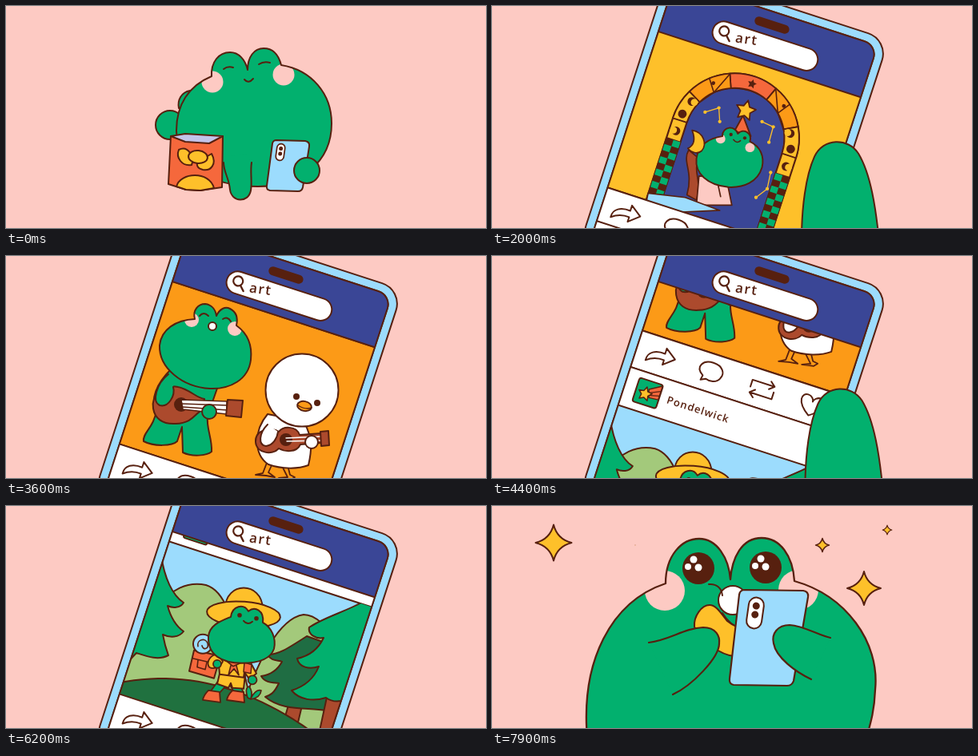
Write an HTML page with a canvas that moves like this. It is 600x278 px and loops after 8000 ms.

```html
<!DOCTYPE html>
<html lang="en">
<head>
<meta charset="utf-8">
<title>Frog and phone</title>
<style>
html, body { margin: 0; width: 100%; height: 100%; overflow: hidden; background: #fdcac3; }
canvas { display: block; width: 100vw; height: 100vh; }
</style>
</head>
<body>
<canvas id="stage"></canvas>
<script>
const W = 600, H = 278, LOOP = 8000, TAU = Math.PI * 2;
const INK = '#57200f', PINK = '#fdcac3', GREEN = '#02b06e', SKY = '#9cdcfd', NAVY = '#3a4696',
  YELLOW = '#fec02a', ORANGE = '#fc9a17', RED = '#f5683c', WOOD = '#ac4a2d', DARK = '#1f6d43',
  HILL = '#a3c97b', WHITE = '#fff';
const TILT = Math.PI / 10, SIN = Math.sin(TILT), COS = Math.cos(TILT);
const ZOOM_X = 302, ZOOM_Y = 133, ZOOM_START = 0.854;
const canvas = document.getElementById('stage'), c = canvas.getContext('2d');
const dpr = window.devicePixelRatio || 1;
canvas.width = W * dpr;
canvas.height = H * dpr;

const clamp = x => Math.max(0, Math.min(1, x));
const ease = x => x * x * (3 - 2 * x);
const ramp = (t, a, b) => ease(clamp((t - a) / (b - a)));
const wave = (t, zero, period) => Math.sin(TAU * (t - zero) / period);

function paint(p, fill, w = 2, ink = INK) {
  if (fill) { c.fillStyle = fill; c.fill(p); }
  if (w) { c.lineWidth = w; c.strokeStyle = ink; c.stroke(p); }
}
const path = (d, fill, w, ink) => paint(new Path2D(d), fill, w, ink);
function oval(x, y, rx, ry, fill, w, rot = 0) {
  const p = new Path2D();
  p.ellipse(x, y, rx, ry, rot, 0, TAU);
  paint(p, fill, w);
}
const dot = (x, y, r, fill, w = 0) => oval(x, y, r, r, fill, w);
function box(x, y, w, h, r, fill, lw) {
  const p = new Path2D();
  p.roundRect(x, y, w, h, r);
  paint(p, fill, lw);
}
function group(fn) { c.save(); fn(); c.restore(); }
function at(x, y, rot, fn) {
  group(() => { c.translate(x, y); c.rotate(rot); fn(); });
}
function zoom(x, y, sx, sy, fn) {
  group(() => { c.translate(x, y); c.scale(sx, sy); c.translate(-x, -y); fn(); });
}
function star(x, y, r, fill, w = 1.6, rot = 0) {
  const p = new Path2D();
  for (let i = 0; i < 10; i++) {
    const a = rot + i * Math.PI / 5, k = i % 2 ? r * 0.5 : r;
    p.lineTo(x + k * Math.sin(a), y - k * Math.cos(a));
  }
  p.closePath();
  paint(p, fill, w);
}
function cheeks(body, spots, r) {
  group(() => {
    c.clip(new Path2D(body));
    for (const [x, y] of spots) dot(x, y, r, PINK);
  });
}
function text(s, x, y, size, gap) {
  c.font = '600 ' + size + 'px "Open Sans", Lato, sans-serif';
  c.letterSpacing = gap + 'px';
  c.fillStyle = INK;
  c.fillText(s, x, y);
}

/* Sitting frog */
const SIT = 'M257 88C256 70 266 58 280 58C291 58 299 67 302 80C302 64 310 53 322 53C334 53 341 62 344 74C382 80 407 110 407 147C407 196 368 226 315 226C256 226 213 200 213 156C213 124 228 100 257 88Z';
function sitting(t) {
  const s = wave(t, 0, 900);
  zoom(300, 230, 1 - 0.05 * s, 1 + 0.06 * s, () => {
    path('M216 128C214 118 219 108 230 106L232 128Z', GREEN);
    dot(205, 149, 18, GREEN, 2);
    path(SIT, GREEN, 0);
    cheeks(SIT, [[258, 95], [347, 86]], 13.5);
    path(SIT);
    path('M272 79Q277 75 284 77M316 73Q322 69 330 71M298 92Q303 98 309 91');
  });
  path('M272 188C272 205 279 216 280 230C282 246 303 247 306 231C308 220 306 208 307 196L300 186Z', GREEN, 0);
  path('M272 196C272 208 279 216 280 230C282 246 303 247 306 231C308 220 305 208 307 196');
  at(0, -1.5 * s, 0, () => {
    path('M206 163L271 163L270 227L243 231L225 230L203 223Z', RED);
    path('M206 163L224 160L271 163L254 172L224 170Z', '#c3c4ea');
    path('M213 226C218 208 254 206 260 228L243 231L225 230Z', YELLOW);
    path('M216 180C228 174 236 190 232 199C220 201 212 190 216 180Z', YELLOW);
    path('M257 185C264 198 256 207 246 205C238 203 238 198 240 195Z', YELLOW);
    oval(240, 189, 12, 8, YELLOW, 2, 0.1);
  });
  at(0, 1.5 * s, 0, () => {
    path('M338 168L374 169Q380 170 379 176L371 227Q370 232 365 232L330 231Q325 230 326 225L333 172Q334 168 338 168Z', SKY);
    at(343, 183, 0.14, () => {
      box(-5, -10.5, 10, 21, 5, WHITE, 1.7);
      dot(0, -4.5, 2.5, INK);
      dot(0, 2, 2.5, INK);
    });
    dot(376, 206, 16, GREEN, 2);
  });
}

/* Feed posts; local axes run along the tilted screen */
const local = fn => at(208, 32, TILT, fn);
const slide = (d, fn) => at(-SIN * d, COS * d, 0, fn);
function strip(top, bottom, fill) {
  local(() => box(-3, top, 273, bottom - top, 0, fill, 2));
}
function clipStrip(top, bottom, fn) {
  group(() => {
    local(() => { c.beginPath(); c.rect(0, top, 267, bottom - top); });
    c.clip();
    fn();
  });
}
function heading(top, name, icon) {
  strip(top, top + 51, WHITE);
  local(() => {
    box(15, top + 9, 31, 31, 3, GREEN, 2);
    at(30.5, top + 24.5, 0, icon);
    text(name, 56, top + 29, 13, 1);
  });
}
function footer(top) {
  strip(top, top + 48, WHITE);
  const y = top + 24;
  local(() => {
    at(32, y, 0, () => path('M4 -12L18 -2L5 9L5 3C-5 2 -11 5 -17 10C-18 -1 -8 -6 4 -5Z', WHITE));
    at(97, y, 0, () => path('M-9 12L-8 6C-21 -2 -13 -13 0 -13C12 -13 18 -5 14 3C11 10 2 11 -3 9Z', WHITE));
    at(165, y, 0, () => path('M-15 1L-15 -8L13 -8M8 -13L14 -8L8 -3M15 -1L15 8L-13 8M-8 3L-14 8L-8 13'));
    at(230, y, 0, () => path('M0 13C-20 0 -16 -12 -8 -12C-3 -12 0 -8 0 -5C0 -8 4 -12 9 -12C18 -11 17 2 0 13Z', WHITE));
  });
}

function faceIcon() {
  dot(0, 0, 9, ORANGE, 2);
  path('M-4 -2h2M2 -2h2M-4 3h8', null, 1.5);
}
function cometIcon() {
  path('M0 -5L15 -14L15 4L3 5Z', RED, 1.4);
  path('M2 -1L15 -7M3 2L15 -1', null, 1.3);
  star(-3, 2, 9, YELLOW, 1.5);
}

function arch() {
  const ring = (a, b, fill) => {
    const p = new Path2D(), q = -Math.PI / 2, k = Math.PI / 180;
    p.arc(0, 0, 75, q + a * k, q + b * k);
    p.arc(0, 0, 58, q + b * k, q + a * k, true);
    p.closePath();
    paint(p, fill, 1.7);
  };
  path('M-75 130L-75 0A75 75 0 0 1 75 0L75 130Z', YELLOW);
  path('M-58 130L-58 0A58 58 0 0 1 58 0L58 130Z', NAVY);
  ring(-22, 22, RED);
  star(0, -66, 5.5, INK, 0);
  for (const s of [-1, 1]) {
    group(() => {
      c.scale(s, 1);
      ring(22, 62, ORANGE);
      path('M28 -69L39 -43L51 -27M39 -43L49 -57', null, 1.5);
      dot(43, -53, 2.2, INK);
      ring(62, 90, YELLOW);
      for (let i = 0; i < 3; i++) {
        const x = [60, 66, 67][i], y = [-25, -8, 13][i];
        dot(x, y, 5, INK);
        if (i !== 1) dot(x + (i ? 3 : -3), y, 4, YELLOW);
      }
      box(58, 24, 17, 106, 0, INK, 1.6);
      for (let i = 0; i < 14; i++) box(58 + i % 2 * 8.5, 24 + i * 7.5, 8.5, 7.5, 0, GREEN, 0);
    });
  }
}
function chain(points) {
  path('M' + points.join('L'), null, 1.2, YELLOW);
  for (const [x, y] of points) dot(x, y, 2, YELLOW);
}
const WIZARD = 'M273 210C273 198 288 197 291 207C297 200 308 206 305 216C317 222 322 233 319 246C314 263 298 270 280 269C256 267 241 253 243 236C245 220 258 212 273 210Z';
function wizard() {
  strip(51, 261, YELLOW);
  clipStrip(51, 261, () => zoom(ZOOM_X, ZOOM_Y, 2 / (1 + ZOOM_START), 2 / (1 + ZOOM_START), () => {
    at(287, 212, TILT, arch);
    chain([[253, 182], [269, 177], [270, 193]]);
    chain([[319, 193], [332, 199], [327, 217]]);
    chain([[329, 252], [325, 271], [312, 281]]);
    path('M234 226C226 240 240 250 232 278L243 284C250 262 238 250 246 236Z', WOOD, 1.6);
    path('M246 256L243 290L284 290L278 260Z', PINK, 1.6);
    path('M268 266L271 280', null, 1.6);
    path('M187 276L230 281L270 296L182 300Z', SKY, 1.6);
    path('M287 204L297 186L306 210Z', RED, 1.8);
    path(WIZARD, GREEN, 0);
    cheeks(WIZARD, [[271, 213], [305, 223]], 5.5);
    path(WIZARD, null, 1.8);
    dot(283, 208, 2, INK);
    dot(299, 212, 2, INK);
    path('M286 214Q290 219 294 215', null, 1.5);
    star(300, 180, 12, YELLOW, 1.7, 0.25);
    path('M238 203C251 205 256 219 249 227C244 231 237 229 233 224C242 220 241 211 238 203Z', YELLOW, 1.6);
  }));
}

const SINGER = 'M236 79C233 68 240 60 249 60C257 61 262 67 263 75C267 66 274 63 280 66C288 70 290 78 288 87C302 97 308 112 306 130C303 155 280 167 255 166C220 164 191 140 192 112C194 92 212 80 236 79Z';
function singer(t) {
  const s = wave(t, 2600, 500), strum = wave(t, 2600, 400);
  path('M206 142C188 160 180 180 188 192C186 214 170 222 172 232C185 239 208 238 214 232L220 214L221 246C233 252 251 250 257 245C258 228 250 216 252 200L266 160Z', GREEN);
  path('M184 191C181 174 198 160 215 164C230 167 238 178 248 179L247 192C236 196 235 209 212 210C195 211 186 203 184 191Z', WOOD);
  dot(219, 186, 9, INK);
  path('M219 180L276 182L276 198L221 192Z', WHITE, 1.6);
  path('M219 185L277 187M220 189L277 193', null, 1.4);
  path('M277 180L296 181L294 202L275 200Z', WOOD);
  dot(254, 195, 9, GREEN, 2);
  at(strum, 3 * strum, 0, () => {
    path('M203 148C188 160 182 182 192 187C203 190 212 175 209 164L211 151Z', GREEN, 0);
    path('M203 148C188 160 182 182 192 187C203 190 212 175 209 164');
  });
  at(1.5 * s, Math.abs(s) * -1.5, 0, () => {
    path(SINGER, GREEN, 0);
    cheeks(SINGER, [[232, 80], [286, 91]], 9);
    path(SINGER);
    path('M242 75Q247 69 253 75M271 79Q277 75 281 82');
    dot(258, 88, 5 + 0.8 * s, WHITE, 2);
  });
}
function bird(t) {
  const s = wave(t, 2600, 500), strum = wave(t, 2600, 400);
  const legs = 'M326 259L321 272L312 274L325 275L336 277L328 271L333 260ZM345 263L352 277L341 278L356 280L361 277L355 274L352 262Z';
  path(legs, ORANGE, 1.8);
  path('M327 198C310 218 309 248 328 261C345 267 365 267 378 262C382 245 384 228 372 207Z', WHITE);
  path('M341 220C346 213 363 212 367 224L394 222L394 234L368 236C363 247 348 245 341 241C333 250 313 247 312 233C311 218 331 213 341 220Z', WOOD);
  dot(350, 230, 8, INK);
  path('M350 228L395 226M351 232L395 231', null, 1.4, WHITE);
  path('M393 220L403 219L404 237L394 238Z', WOOD);
  dot(382, 233, 8, WHITE, 2);
  at(0, 2 * strum, 0, () => {
    path('M327 211C316 222 315 237 325 238C334 237 339 228 340 220', WHITE);
  });
  at(s, -1.5 * Math.abs(s), 0, () => {
    dot(370, 168, 45.5, WHITE, 2);
    dot(363, 176, 4, INK);
    dot(389, 184, 4, INK);
    oval(373, 188, 9, 6, ORANGE, 2, 0.2);
    path('M365 187Q374 193 382 190', null, 1.5);
  });
}

const ground = x => 216 + 0.0019 * (x - 195) ** 2;
function flower(x, colour) {
  const y = ground(x) - 7;
  path(`M${x} ${y}Q${x + 1} ${y + 10} ${x - 2} ${y + 19}`, null, 2);
  for (let i = 0; i < 6; i++) dot(x + 7 * Math.cos(i * TAU / 6), y + 7 * Math.sin(i * TAU / 6), 4, colour, 1.6);
  dot(x, y, 7, colour);
  dot(x, y, 3.5, WHITE, 1.6);
}
function sprout(x) {
  const y = ground(x);
  path(`M${x - 10} ${y - 2}Q${x - 14} ${y - 15} ${x - 8} ${y - 16}Q${x - 3} ${y - 9} ${x - 6} ${y - 1}Q${x} ${y - 13} ${x + 7} ${y - 11}Q${x + 6} ${y - 2} ${x - 6} ${y}Z`, GREEN, 1.7);
}
function leg(x, lift) {
  path(`M272 210L287 212L${x + 10} ${234 - lift}L${x - 2} ${233 - lift}Z`, GREEN, 1.8);
  path(`M${x - 4} ${231 - lift}L${x + 10} ${233 - lift}L${x + 11} ${246 - lift}L${x - 11} ${243 - lift}Q${x - 10} ${237 - lift} ${x - 4} ${231 - lift}Z`, RED, 1.8);
}
function torso(swing) {
  path('M235 182L268 189L260 217L229 208Z', RED);
  path('M233 192L263 199M240 194L239 203L249 206L251 197', null, 1.6);
  dot(246, 174, 12, SKY, 2);
  path('M240 177C238 169 249 165 252 173C254 181 246 182 245 176', null, 1.6);
  path('M268 207L299 212L297 230L283 229L281 223L278 229L264 224Z', YELLOW);
  path('M265 188L304 194L313 211L304 218L298 209L297 216L267 212Z', YELLOW);
  path('M274 194L284 202L295 197M281 201L278 213L285 205L291 213L288 201', RED, 1.6);
  path('M298 197L307 200L306 211L297 209Z', RED, 1.5);
  dot(308, 220 - swing, 5.5, GREEN, 1.8);
  path('M265 187C255 187 250 197 254 203C259 206 267 204 271 196Z', YELLOW, 1.8);
  dot(264, 198 + swing, 5, GREEN, 1.8);
}
function hiker(t) {
  const ph = TAU * (0.05 + (t - 5000) / 545), swing = Math.sin(ph), step = Math.cos(ph);
  leg(272 + 15 * swing, Math.max(0, step) * 3);
  leg(272 - 15 * swing, Math.max(0, -step) * 3);
  at(0, -1.2 * Math.abs(swing), 0, () => {
    torso(swing);
    path('M274 130C274 95 320 95 321 130Z', YELLOW);
    oval(297, 137, 46, 16, YELLOW, 2, 0.08);
    path('M253 165C254 150 269 145 281 140C283 126 297 123 303 133C311 126 323 132 321 147C332 153 338 167 335 180C330 195 312 198 295 198C270 198 252 188 253 165Z', GREEN);
    dot(292, 138, 2.8, INK);
    dot(313, 142, 2.8, INK);
    path('M297 145Q302 151 308 146');
  });
}
function forest(t) {
  const walk = 0.09 * (t - 5000);
  strip(13, 214, SKY);
  clipStrip(13, 214, () => {
    path('M80 300C170 130 205 90 250 99C285 110 285 170 320 300Z', HILL);
    path('M280 300C315 180 345 140 372 136C402 136 430 190 470 300Z', HILL);
    path('M354 246L343 284L361 288L370 250Z', WOOD);
    path('M376 163C350 180 340 186 327 186C331 194 339 193 345 195C338 208 326 212 319 213C324 222 334 221 341 222C335 235 330 237 324 239C345 257 375 252 400 256L410 175Z', DARK);
    path('M402 235L391 286L413 290L422 238Z', WOOD);
    path('M446 120C425 132 396 140 379 152C377 161 388 167 397 165C390 180 378 188 364 191C366 202 379 205 391 201C385 216 373 226 357 231C367 243 384 245 400 240C408 246 416 246 426 242L480 130Z', GREEN);
    path('M194 62C198 90 208 112 222 121C218 128 208 128 202 125C206 140 212 150 222 157C216 165 205 165 196 161C198 172 200 179 203 187C190 194 175 188 163 184L120 230Z', GREEN);
    let d = 'M100 300';
    for (let x = 110; x <= 390; x += 10) d += `L${x} ${ground(x)}`;
    path(d + 'L390 330Z', '#20713f');
    flower(184 - walk, PINK);
    flower(237 - walk, SKY);
    sprout(420 - walk);
    hiker(t);
  });
}

/* Phone held up close */
function thumb(t) {
  const second = t > 3300, t0 = second ? 4100 : 1850;
  const show = second ? ramp(t, 3850, 4100) * (1 - ramp(t, 4700, 4900))
    : ramp(t, 1600, 1850) * (1 - ramp(t, 2700, 2950));
  if (show <= 0) return;
  const left = 1 - ramp(t, t0, t0 + 600);
  at(-13 * left + (1 - show) * (t < 1850 ? 30 : 0), 8 * left * left + 130 * (1 - show), 0, () =>
    path('M398 300C397 245 404 205 414 183C425 159 456 159 469 179C484 204 491 245 496 300Z', GREEN));
}
function phone(t) {
  const z = ZOOM_START + (1 - ZOOM_START) * ramp(t, 1000, 1800);
  const y = 356 * ramp(t, 1850, 2450) + 299 * ramp(t, 4100, 4700);
  zoom(ZOOM_X, ZOOM_Y, z, z, () => {
    local(() => {
      box(-11, -79, 288, 364, 27, SKY, 2);
      box(0, -68, 266, 341, 17, WHITE, 2);
    });
    group(() => {
      local(() => { c.beginPath(); c.roundRect(0, -68, 266, 341, 17); });
      c.clip();
      if (y < 330) slide(-y, () => {
        heading(0, 'Flomber', faceIcon);
        wizard();
        footer(261);
      });
      if (y > 30 && y < 640) slide(356 - y, () => {
        heading(-51, 'Quiverel', faceIcon);
        strip(0, 214, ORANGE);
        singer(t);
        bird(t);
        footer(214);
      });
      if (y > 356) slide(655 - y, () => {
        heading(-37, 'Pondelwick', cometIcon);
        forest(t);
        footer(214);
      });
      local(() => box(-3, -72, 273, 72, 0, NAVY, 2));
    });
    local(() => {
      box(0, -68, 266, 341, 17, null, 2);
      box(110, -57, 45, 11, 5.5, INK, 0);
      box(64, -38, 137, 28, 14, WHITE, 2);
      dot(78, -26, 6, null, 2.2);
      path('M82.5 -21.5L88 -16', null, 2.4);
      at(95, -17, -0.17, () => text('art', 0, 0, 17, 1.5));
    });
  });
  thumb(t);
}

/* Close-up with sparkles */
const BIG = 'M119 290C111 195 148 120 217 97C217 62 237 41 259 41C281 41 296 65 298 92C300 65 312 40 337 40C360 40 376 62 378 94C442 112 485 170 479 230C478 255 474 270 468 290Z';
function eye(x, y, s) {
  dot(x, y, 20, INK);
  dot(x - 6, y - 11, 4.5, WHITE);
  dot(x - 13, y - 2 + s, 4, WHITE);
  dot(x, y - 1 - s, 4.5, WHITE);
}
function sparkle(t, x, y, r, start, span) {
  const k = (t - start) / span;
  if (k <= 0 || k >= 1) return;
  r *= Math.sin(Math.PI * k);
  const q = r * 0.2;
  at(x, y, 0, () => path(`M0 ${-r}Q${q} ${-q} ${r} 0Q${q} ${q} 0 ${r}Q${-q} ${q} ${-r} 0Q${-q} ${-q} 0 ${-r}Z`, YELLOW, Math.min(2, r / 5)));
}
function closeup(t) {
  const s = wave(t, 7900, 400);
  path(BIG, GREEN, 0);
  cheeks(BIG, [[216, 106], [383, 105]], 25);
  path(BIG, null, 2.3);
  eye(258, 78, s * 0.7);
  eye(342, 77, s * 0.7);
  dot(301, 118, 18, WHITE, 2);
  path('M271 98C281 97 287 103 288 112M288 134C295 146 303 151 312 154');
  at(s, 2 * s, 0, () => {
    path('M253 151C252 138 262 124 272 124C281 124 287 136 294 144C301 150 306 151 310 153L303 188C287 187 258 168 253 151Z', YELLOW);
    const arm = 'M196 171C222 168 240 153 264 152C280 152 285 163 284 172C284 190 250 225 226 236';
    path(arm, GREEN, 0);
    path(arm, null, 2.2);
  });
  path('M316 105L389 106Q396 107 395 114L377 219Q375 225 369 225L302 224Q296 223 297 216L309 111Q310 105 316 105Z', SKY, 2.2);
  at(329, 134, 0.14, () => {
    box(-9.5, -19.5, 19, 39, 9.5, WHITE, 2);
    dot(0, -9, 4.5, INK);
    dot(0, 2, 4.5, INK);
  });
  const hand = 'M423 165C408 162 390 150 372 149C357 149 349 160 352 172C355 190 380 208 399 217';
  path(hand, GREEN, 0);
  path(hand, null, 2.2);
  sparkle(t, 77, 46, 22.5, 7200, 1400);
  sparkle(t, 465, 103, 21, 7300, 1200);
  sparkle(t, 413, 49, 13, 7700, 900);
  sparkle(t, 494, 30, 17, 7100, 900);
  sparkle(t, 179, 49, 18, 6950, 960);
}

function draw(now) {
  const t = Math.floor(now % LOOP / 100) * 100;
  c.setTransform(canvas.width / W, 0, 0, canvas.height / H, 0, 0);
  c.lineJoin = c.lineCap = 'round';
  c.fillStyle = PINK;
  c.fillRect(0, 0, W, H);
  if (t < 1000) sitting(t);
  else if (t < 6600) phone(t);
  else closeup(t);
}
let begin;
function tick(now) {
  begin ??= now;
  draw(now - begin);
  requestAnimationFrame(tick);
}
draw(0);
requestAnimationFrame(tick);
</script>
</body>
</html>
```
